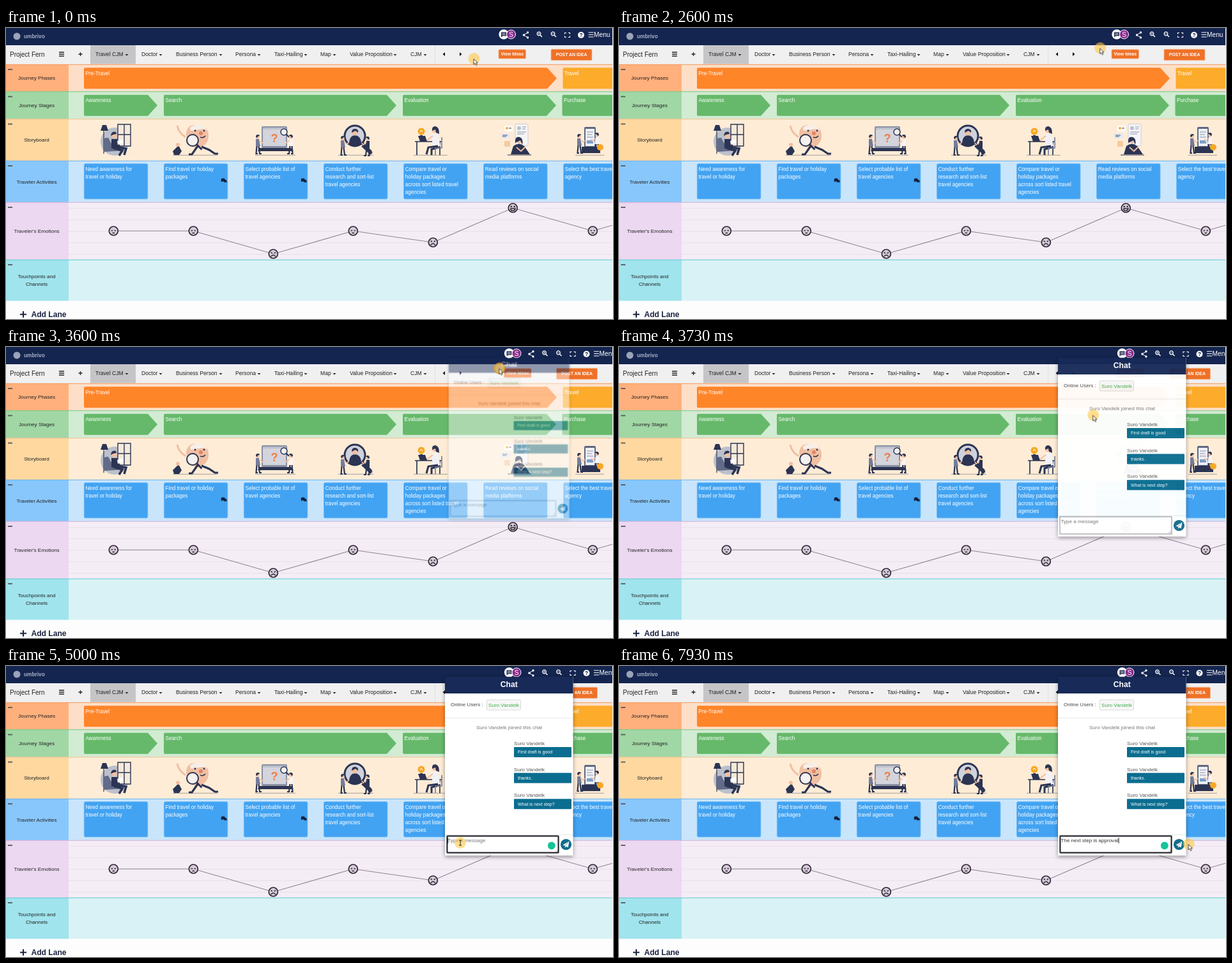
Animation, 950 px wide and 456 px high, one loop 8000 ms. Source, as an HTML page:

```html
<!DOCTYPE html>
<html lang="en">
<head>
<meta charset="utf-8">
<title>Journey map with chat</title>
<style>
html, body { margin: 0; width: 100%; height: 100%; overflow: hidden; background: #fdfdfd; }
svg { display: block; width: 950px; height: 456px; font-family: "Liberation Sans", Arial, sans-serif; }
.shift, .panel, .focus, .cursor, .arrow, .beam, .ring { animation: 8s linear infinite; }
.shift { animation-name: shift; }
.panel {
  animation-name: fade, grow;
  transform-origin: 787.5px 17px;
  filter: drop-shadow(0 2px 3px rgba(0, 0, 0, .4));
}
.focus { animation-name: focus; }
.cursor { animation-name: move; }
.arrow { animation-name: arrow; }
.beam { animation-name: beam; }
.ring { animation-name: ring; }
@keyframes shift {
  0%, 43.74% { transform: none; }
  43.75%, 100% { transform: translateX(8.5px); }
}
@keyframes fade {
  0%, 43.75% { opacity: 0; animation-timing-function: cubic-bezier(.4, 0, .2, 1); }
  47.58%, 100% { opacity: 1; }
}
@keyframes grow {
  0%, 43.75% { transform: scale(.75, .5625); animation-timing-function: cubic-bezier(.4, 0, .2, 1); }
  46.3%, 100% { transform: none; }
}
@keyframes focus { 0%, 57.49% { opacity: 0; } 57.5%, 100% { opacity: 1; } }
@keyframes move {
  0%, 31.6% { transform: translate(732.5px, 48px); }
  32.5% { transform: translate(753px, 31.5px); animation-timing-function: ease-out; }
  36.5%, 43.3% { transform: translate(779px, 11px); }
  45% { transform: translate(772.5px, 33px); }
  50% { transform: translate(680px, 258px); animation-timing-function: ease-out; }
  56%, 86.7% { transform: translate(711px, 277px); animation-timing-function: ease-in-out; }
  95.5%, 97% { transform: translate(917px, 279px); }
  99.1% { transform: translate(892px, 279px); }
  100% { transform: translate(883px, 279px); }
}
@keyframes arrow { 0%, 53.49% { opacity: 1; } 53.5%, 93.2% { opacity: 0; } 93.21%, 100% { opacity: 1; } }
@keyframes beam { 0%, 53.49% { opacity: 0; } 53.5%, 93.2% { opacity: 1; } 93.21%, 100% { opacity: 0; } }
@keyframes ring { 0%, 42.5% { opacity: 0; } 43.2%, 45% { opacity: .8; } 46.2%, 100% { opacity: 0; } }
</style>
</head>
<body>
<svg id="stage" viewBox="0 0 950 456"></svg>
<script>
const navy = '#14254f', ink = '#2c3453', skin = '#f1bfa2', grey = '#bcc0cb', amber = '#f9a825';
const user = 'Suro Vandelk';

const text = (x, y, s, size, fill, attrs = '') =>
  `<text x="${x}" y="${y}" font-size="${size}" fill="${fill}" ${attrs}>${s}</text>`;
const rect = (x, y, w, h, fill, attrs = '') =>
  `<rect x="${x}" y="${y}" width="${w}" height="${h}" fill="${fill}" ${attrs}/>`;
const circle = (x, y, r, fill, attrs = '') =>
  `<circle cx="${x}" cy="${y}" r="${r}" fill="${fill}" ${attrs}/>`;
const shape = (d, fill, attrs = '') => `<path d="${d}" fill="${fill}" ${attrs}/>`;
const line = (d, stroke, width = 1, attrs = '') =>
  `<path d="${d}" fill="none" stroke="${stroke}" stroke-width="${width}" ${attrs}/>`;
const at = (x, y, body) => `<g transform="translate(${x} ${y})">${body}</g>`;
const mid = 'text-anchor="middle"', bold = 'font-weight="bold"';

function topBar() {
  const zoom = (x, plus) => at(x, 10, circle(-1, -1, 2.8, 'none', 'stroke="#fff" stroke-width="1.2"') +
    line('M1 1L4 4', '#fff', 1.5) + line('M-2.5 -1H.5' + (plus ? 'M-1 -2.5V.5' : ''), '#fff', .8));
  return rect(0, 0, 950, 27, navy) +
    circle(17, 13, 5.5, '#9aa3ba') +
    text(28, 16, 'umbrivo', 8.3, '#a9b1c6', bold) +
    `<g class="shift">` +
    circle(779, 10, 7.7, '#fff') +
    shape('M775 6.5h8v6h-5.5l-2.5 2z', ink) + line('M776.5 8.5h5M776.5 10.5h5', '#fff', .7) +
    circle(790.5, 10, 7, '#8b2b8f', 'stroke="#fff" stroke-width="1"') +
    text(790.5, 13.5, 'S', 10, '#fff', mid) +
    line('M817 7L810 11L817 15', '#fff', 1) +
    [[816.5, 7], [810.5, 11], [816.5, 15]].map(p => circle(...p, 1.7, '#fff')).join('') +
    zoom(835, true) + zoom(857, false) +
    line('M874.5 9.5V7.5H877M880 7.5H882.5V9.5M882.5 12.5V14.5H880M877 14.5H874.5V12.5', '#fff', 1.2) +
    circle(900, 11, 5, '#fff') + text(900, 14, '?', 8.5, navy, mid + bold) +
    line('M911.5 7H919.5M911.5 10.5H919.5M911.5 14H919.5', '#fff', 1.2) +
    text(920, 14, 'Menu', 10.2, '#fff') + '</g>';
}

function navBar() {
  const tabs = [[140, 'Travel CJM', 189], [212, 'Doctor', 242], [266, 'Business Person', 336],
    [359, 'Persona', 396], [420, 'Taxi-Hailing', 469], [492, 'Map', 514],
    [538, 'Value Proposition', 609], [633, 'CJM', 656]];
  const button = (x, y, w, h, s, size) =>
    rect(x, y, w, h, '#ef7127', 'rx="1.5" stroke="#f5b48e" stroke-width=".8"') +
    text(x + w / 2, y + h / 2 + 2.4, s, size, '#fff', mid + bold);
  return rect(0, 27, 950, 30, '#f0f0f1') + rect(132, 27, 71, 29.5, '#c5c5c7') +
    line('M671.5 27V57', '#e0e0e2') +
    text(6, 45, 'Project Fern', 10, '#222') +
    line('M83 38H91M83 41H91M83 44H91', '#222', 1.4) +
    line('M113.5 41H119.5M116.5 38V44', '#222', 1.3) +
    tabs.map(([x, s, c]) => text(x, 44.3, s, 8.6, '#222') +
      shape(`M${c - 2.5} 41h5l-2.5 2.6z`, '#222')).join('') +
    shape('M687 38v6l-3.5 -3z', '#111') + shape('M710 38v6l3.5 -3z', '#111') +
    `<g class="shift">${button(771, 33.8, 42.5, 14.2, 'View Ideas', 7)}${
      button(853, 33.3, 64, 17.4, 'POST AN IDEA', 6.9)}</g>`;
}

function lanes() {
  const rows = [
    [57, 42.5, '#ffb07c', '#fddfc8', '#f59a5a', 'Journey Phases'],
    [99.5, 43, '#a1d7a5', '#d2ebd3', '#79c47f', 'Journey Stages'],
    [142.5, 65.5, '#ffd8a0', '#feecd6', '#e3bd8a', 'Storyboard'],
    [208, 65, '#88c7fb', '#c9e5fb', '#6cb2ec', 'Traveler Activities'],
    [273, 90, '#ecd8f0', '#f5edf6', '#cfb2d6', 'Traveler\'s Emotions'],
    [363, 64.5, '#a0e4ed', '#d9f2f5', '#5fcbd2', 'Touchpoints and|Channels']];
  return rows.map(([y, h, dark, light, edge, name]) => {
    const words = name.split('|'), base = y + h / 2 + 3 - (words.length - 1) * 6;
    return rect(0, y, 98, h, dark) + rect(98, y, 851, h, light) + line(`M0 ${y + .3}H949`, edge) +
      line(`M3 ${y + 8}H10`, '#55595c', 1.8) +
      words.map((s, i) => text(48, base + i * 12, s, 8.1, '#222', mid)).join('');
  }).join('');
}

function arrows() {
  const arrow = (x, end, y, fill, name) =>
    shape(`M${x + 2} ${y}H${end - 15}L${end} ${y + 16.5}L${end - 15} ${y + 33}H${x + 2}q-2 0-2-2V${y + 2}q0-2 2-2z`, fill) +
    text(x + 2.5, y + 11.7, name, 8.15, '#fff');
  return arrow(122, 862, 62.3, '#ff8529', 'Pre-Travel') + arrow(871.5, 1100, 62.3, '#fcab2b', 'Travel') +
    [[122, 237, 'Awareness'], [247, 611, 'Search'], [621, 861, 'Evaluation'], [870.5, 1100, 'Purchase']]
      .map(([x, end, s]) => arrow(x, end, 104.7, '#66b96a', s)).join('');
}

function cards() {
  const notes = ['Need awareness for|travel or holiday', 'Find travel or holiday|packages',
    'Select probable list of|travel agencies', 'Conduct further|research and sort-list|travel agencies',
    'Compare travel or|holiday packages|across sort listed travel|agencies',
    'Read reviews on social|media platforms', 'Select the best travel|agency'];
  const bubbles = '<g transform="scale(.88)" fill="#16203c"><ellipse cx="-1.5" cy="-1" rx="3.6" ry="2.8"/>' +
    '<ellipse cx="2" cy="1.2" rx="3" ry="2.3"/><path d="M-4.5 0L-5 3L-2 1zM3 2L5 4.5L5 1z"/></g>';
  return notes.map((note, i) => {
    const x = 122.3 + 125.05 * i;
    return rect(x, 212.7, 99.5, 55.2, '#42a3f2', 'rx="2" stroke="#6db8f5" stroke-width=".8"') +
      note.split('|').map((s, n) => text(x + 2.2, 224 + n * 12, s, 8.15, '#fff')).join('') +
      (i == 1 || i == 2 ? at(x + 93.7, 238.8, bubbles) : '');
  }).join('');
}

function emotions() {
  const levels = [318, 318, 354, 318, 336, 282, 318, 282];
  const points = levels.map((y, i) => [168.3 + 125 * i, y]);
  const moods = {
    318: ['#d9cada', 'M-3.6 -.5h2.4M1.2 -.5h2.4M-1.8 3.2h3.6'],
    282: ['#d9cada', 'M-3.8 -1.2l1.3 -1.4 1.3 1.4M1.2 -1.2l1.3 -1.4 1.3 1.4M-3.8 1h7.6q-.8 3.4-3.8 3.4t-3.8-3.4'],
    other: ['#d6cad9', 'M-3.6 -2.6l2.2 1.8M3.6 -2.6l-2.2 1.8M-3.6 4q3.6-4.6 7.2 0']
  };
  const face = ([x, y]) => {
    const [fill, d] = moods[y] || moods.other;
    return at(x, y, circle(0, 0, 7, fill, 'stroke="#2d2935" stroke-width="1.7"') + line(d, '#2d2935', 1.4));
  };
  return [282, 300, 318, 336, 354].map(y => line(`M98 ${y + .5}H949`, '#e9e0ea')).join('') +
    line('M' + points.join('L'), '#8b8590', 1.1) + points.slice(0, 7).map(face).join('');
}

function storyboard() {
  const person = (x, y, top = ink, dir = 1) => at(x, y, `<g transform="scale(${dir} 1)">` +
    circle(0, 0, 2.7, skin) + shape('M-3 0q0-4 3-4t3 2q-3 0-4 3z', ink) +
    shape('M-3 3h5l2 11h-7z', top) + line('M2 5L7 9L9 6', skin, 1.6) +
    line('M-1.5 14L-2.5 26H0M1.5 14L3 26H6', ink, 2.2) + '</g>');
  const ground = (x, w) => line(`M${x} 199.3h${w}`, '#8f8b8e', .8);
  const lens = (x, y, r, dx, width, fill = '#f4f1ee') =>
    line(`M${x + r * .7 * dx} ${y + r * .7}l${r * .9 * dx} ${r * .9}`, ink, width * 1.4) +
    circle(x, y, r, fill, `stroke="${ink}" stroke-width="${width}"`);
  const reading = circle(170, 178, 22, grey) + rect(175, 151, 20, 34, '#f6e9da') +
    line('M175 151H195V185H175zM185 151V185M175 167H195', ink, 1.4) +
    line('M153 197V157', ink, 1.2) + shape('M148 161l3-9h6l3 9z', ink) +
    shape('M152 178q0-7 8-6l7 13h17v7l-30 2z', '#626b88') + circle(170, 169, 4, skin) +
    shape('M164 169q1-8 8-6l1 3-5 1z', ink) + shape('M165 174h9l5 12-14 3z', ink) +
    line('M172 186L188 189L185 199M168 188L182 192L177 200', ink, 3.5) + shape('M174 177l9-3 1 6-9 3z', '#fff');
  const finder = ground(261, 70) + shape('M282 166q1-16 18-14 18 2 17 18-1 14-16 18-16 0-19-22z', skin) +
    shape('M288 156q9-8 22-2l5 7-6-3-20 3z', '#f6efe8') + circle(305, 165, 3, '#de866b') +
    circle(296, 161, 1.4, ink) + circle(310, 161, 1.4, ink) + line('M304 171q5 2 8-2', ink, 1.5) +
    line('M300 185L291 198H286M306 186L318 191L327 197H332', ink, 3.2) +
    line('M281 171Q270 164 268 153', skin, 3) + lens(292, 176, 9, 1, 2) +
    shape('M261 193l9-9 5 9-4 6h-8z', ink) + circle(269, 183, 3, skin);
  const laptop = ground(390, 63) + rect(400, 154, 40, 34, '#8a90a4', 'rx="2"') + rect(402, 156, 36, 29, '#d3d4dc') +
    rect(402, 156, 36, 3, grey) + shape('M396 188h50l4 5h-56z', ink) +
    text(420, 179, '?', 18, '#ef7c43', mid + bold) + lens(435, 163, 5, 1, 1.5) +
    person(394, 171, '#727c9c') + person(446, 171, '#f5f4f6', -1);
  const team = ground(520, 55) + line('M558 184L572 197', ink, 5) +
    lens(546, 169, 16, 1, 3, '#cfd2dc') + shape('M537 182q0-13 9-14 10 1 10 14-9 5-19 0z', ink) +
    circle(546, 164, 4.5, skin) + shape('M541 164q0-7 6-6 5 1 4 6l-4-3z', ink) +
    person(527, 173, '#727c9c') + person(566, 174, ink, -1);
  const desk = ground(638, 53) + circle(650, 162, 5.5, amber) + line('M648 163l2-3 2 3', '#fff', 1) +
    rect(648, 168, 4, 3, ink) + line('M640 178H682M643 178V199M679 178V199', ink, 1.7) +
    circle(671, 160, 4, skin) + shape('M667 161q-1-7 5-7 6 1 6 12l-5-2-1-5z', ink) +
    shape('M667 166h9l4 19h-13z', '#f2f2f6') + line('M668 169L659 176H653', skin, 2) +
    shape('M645 169h11l3 9h-11z', ink) + line('M676 185L661 187L658 198M678 187L666 190V199', ink, 3) +
    line('M682 171V188H672V199', '#737b96', 1.6);
  const reviews = rect(797, 150.5, 20, 34, '#f5f4f6', 'rx="2" stroke="#c3c6d2" stroke-width=".8"') +
    circle(803, 157, 3, grey) + line('M808 155h6M808 158h5M800 163h14M800 166h11', '#8b94ab', 1) +
    rect(780, 153, 13, 9, '#fff', 'rx="1"') + circle(784, 157, 2, amber) + line('M787 157h4', ink) +
    rect(774, 165, 15, 8, '#e7e9f0', 'rx="1"') + line('M777 168h8M777 170h6', ink, .8) +
    rect(780, 177, 9, 9, '#f6cb9e', 'rx="1"') + circle(803, 177, 4, skin) +
    shape('M797 180q-1-11 7-9 6 2 4 12l-3-7z', ink) + shape('M794 185q9-7 17 0l9 13h-30z', ink) +
    line('M799 187L806 193L812 187', skin, 2) + line('M785 199H822', ink, 1.2);
  const purchase = ground(891, 45) + rect(905, 155, 18, 38, '#5e6884', 'rx="2"') + rect(907, 158, 14, 27, '#eef0f5') +
    line('M909 163h10M909 167h8M909 171h10', '#8b94ab', 1.2) + rect(909, 176, 10, 5, '#7b9fca') +
    shape('M901 186h29v10h-29z', ink) + person(897, 170, '#727c9c') + person(925, 168, '#f4f4f7', -1) +
    circle(930, 187, 5, amber);
  return reading + finder + laptop + team + desk + reviews + purchase;
}

function chat() {
  const bubbles = ['First draft is good', 'thanks.', 'What is next step?'];
  return `<g class="panel">` + rect(687, 17, 200.5, 280, '#fff') + rect(687, 17, 200.5, 26, '#182a58') +
    text(787.3, 32.5, 'Chat', 12.1, '#fff', mid + bold) +
    text(696, 63, 'Online Users :', 8, '#444') +
    rect(752.5, 53, 53, 16, '#f7f7f7', 'rx="1.5" stroke="#d9d9d9"') + text(755, 63.6, user, 8.1, '#3fae49') +
    line('M687 81.5H887M687 264.5H887', '#e8e8e8') +
    text(787.5, 99, user + ' joined this chat', 8, '#777', mid) +
    bubbles.map((s, i) => {
      const y = 127 + i * 40.6;
      return text(795, y - 3, user, 8.1, '#555') + rect(795, y, 90, 16, '#0b6d8f', 'rx="1"') +
        text(801, y + 10.3, s, 7, '#fff');
    }).join('') +
    rect(690, 266, 175, 27, '#fff', 'stroke="#85858a"') + line('M860 292L864 288M862.5 292L864 290.5', '#888', .7) +
    `<g class="focus">` + rect(690.5, 266.5, 174, 26, 'none', 'rx="1" stroke="#22252b" stroke-width="2"') +
    circle(853.8, 281.5, 5.9, '#15c39a') + '</g>' +
    text(691.5, 276, '', 8.05, '#757575', 'id="entry"') +
    rect(691, 269, .9, 9, '#111', 'id="caret"') +
    circle(876.5, 279.7, 8.6, '#126d8b') +
    shape('M871.5 280.5L881.5 274.5L879.7 284.2L876.5 282.7L875 285V281.7z', '#fff') +
    line('M875 281.7L880.5 275.7', '#126d8b', .7) + '</g>';
}

const pointer = '<g class="cursor">' + circle(0, 0, 9, '#ffc846', 'opacity=".6"') +
  circle(0, 0, 8, 'none', 'class="ring" stroke="#d98a1e" stroke-width="1.5"') +
  `<g class="arrow">${shape('M-.5 .5V9L1.5 7.2L3 10.5L4.6 9.8L3.2 6.6H5.8z', '#fff', 'stroke="#222" stroke-width=".8"')}</g>` +
  `<g class="beam">${line('M-2 -4H2M0 -4V4M-2 4H2', '#222', 1)}</g></g>`;

document.getElementById('stage').innerHTML = topBar() + navBar() + lanes() + arrows() + cards() + emotions() +
  storyboard() + line('M22 448.8H32M27 443.8V453.8', '#1b2340', 2) +
  text(39.5, 453, 'Add Lane', 12.1, '#1b2340', bold) + rect(949, 0, 1, 456, '#fdfdfd') + chat() + pointer;

// Typing and the blinking caret
const entry = document.getElementById('entry'), caret = document.getElementById('caret');
const message = 'The next step is approval', focusAt = 4600, typeAt = 5180, perChar = 61;
const typeEnd = typeAt + perChar * message.length;
let start, shown;

function frame(now) {
  start ??= now;
  const t = (now - start) % 8000;
  const typed = message.slice(0, Math.max(0, Math.floor((t - typeAt) / perChar)));
  if (typed !== shown) {
    shown = typed;
    entry.textContent = typed || 'Type a message';
    entry.setAttribute('fill', typed ? '#333' : '#757575');
    caret.setAttribute('x', typed ? 691.7 + entry.getComputedTextLength() : 691.2);
  }
  const typing = t > typeAt && t < typeEnd;
  const idle = t - (t < typeAt ? focusAt : typeEnd);
  caret.style.opacity = typing || (t >= focusAt && idle % 1060 < 530) ? 1 : 0;
  requestAnimationFrame(frame);
}
requestAnimationFrame(frame);
</script>
</body>
</html>
```
